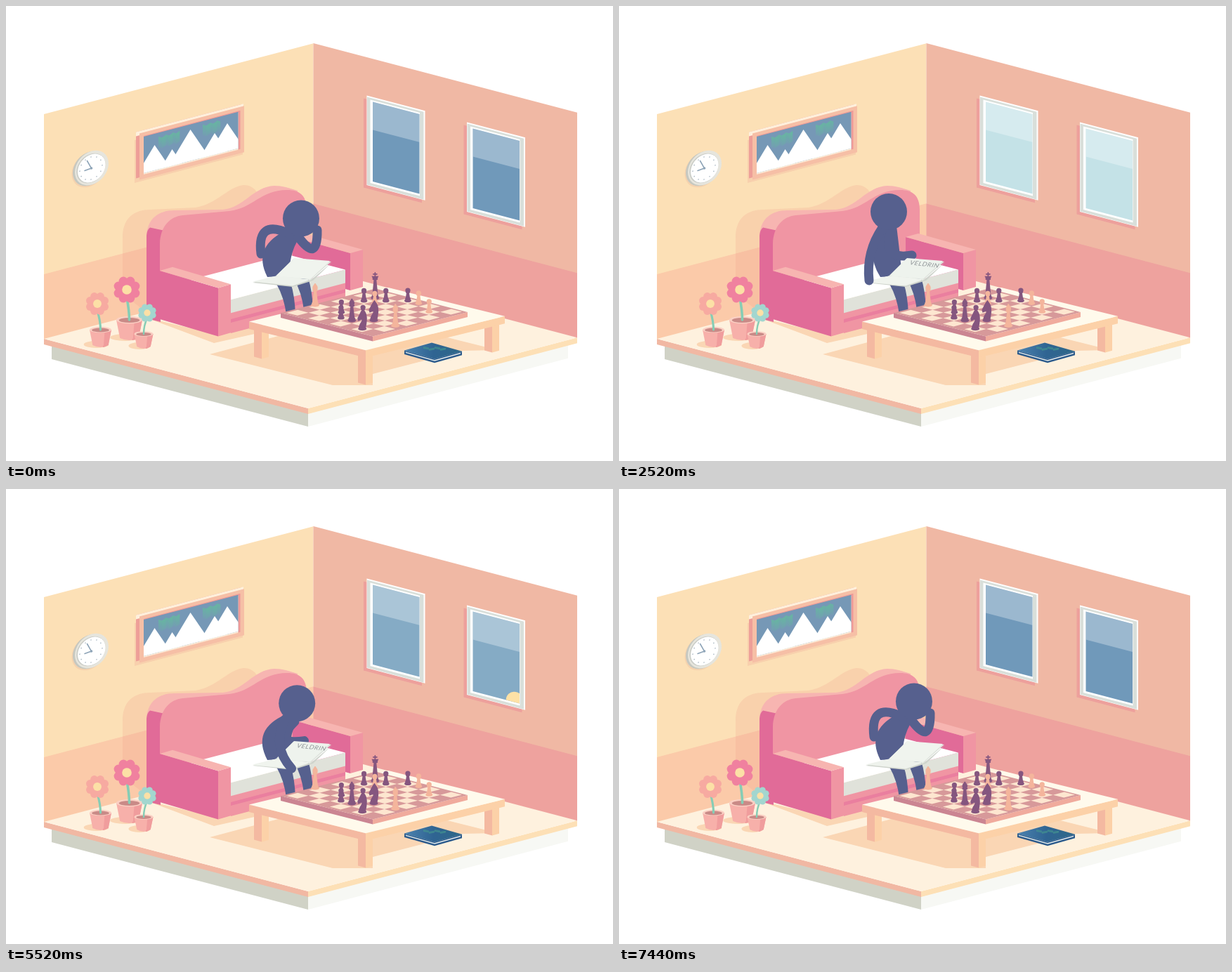
Write an HTML page with a canvas that moves like this. It is 864x648 px and loops after 8160 ms.

```html
<!DOCTYPE html>
<html lang="en">
<head>
<meta charset="utf-8">
<title>Chess room</title>
<style>
html, body { margin: 0; width: 100%; height: 100%; overflow: hidden; background: #fff; }
canvas { display: block; }
</style>
</head>
<body>
<canvas id="stage" width="864" height="648"></canvas>
<script>
const g = document.getElementById('stage').getContext('2d');
const LOOP = 8160, STEP = 40, K = 0.263; // K: slope of the isometric axes
const BODY = '#56608e', ROSE = '#f095a3', DEEP = '#e16b98', BLUSH = '#f7b5b1';
const SAND = '#fad6b4', PEACH = '#f4b9a1', HONEY = '#fcd1a8';
const PLUM = '#85567f', CORAL = '#f4b59c', DARK = '#d7999a', LIGHT = '#fde6d0';

const mix = (a, b, k) => a.map((v, i) => v + (b[i] - v) * k);
const part = (t, a, b) => Math.min(1, Math.max(0, (t - a) / (b - a)));
const ease = (t, a, b) => { const k = part(t, a, b); return k * k * (3 - 2 * k); };
// moves from one place to the next; each move is [place, begin, end]
const travel = (t, from, ...moves) => moves.reduce((p, [to, a, b]) => mix(p, to, ease(t, a, b)), from);

function poly(color, ...p) {
  g.beginPath();
  for (let i = 0; i < p.length; i += 2) g.lineTo(p[i], p[i + 1]);
  g.closePath();
  g.fillStyle = color;
  g.fill();
}
function shape(color, d) { g.fillStyle = color; g.fill(new Path2D(d)); }
function oval(color, x, y, rx, ry = rx) {
  g.beginPath(); g.ellipse(x, y, rx, ry, 0, 0, 7); g.fillStyle = color; g.fill();
}
function line(color, w, d) {
  g.strokeStyle = color; g.lineWidth = w; g.lineCap = 'round'; g.stroke(new Path2D(d));
}
// upright panel with top left corner (x, y)
function side(color, x, y, w, h, k = K) {
  poly(color, x, y, x + w, y + w * k, x + w, y + w * k + h, x, y + h);
}
// box with the left corner of its top at (x, y), a long to the front and b long to the back
function block(x, y, a, b, h, [top, left, right], k = K) {
  side(left, x, y, a, h, k);
  side(right, x + a, y + a * k, b, h, -k);
  poly(top, x, y, x + a, y + a * k, x + a + b, y + (a - b) * k, x + b, y - b * k);
}

function room() {
  block(65, 482, 365, 370, 21, ['#fff', '#d0d2c6', '#f7f8f4']);
  side('#fce0b6', 54, 154, 383.5, 320, -K);
  side('#fbcaa9', 54, 382, 383.5, 94, -K);
  side('#f0b8a4', 437.5, 53, 375.5, 320);
  side('#eea29e', 437.5, 281.5, 375.5, 94);
  block(54, 474, 376, 383, 8, ['#fef1de', '#f1b8a3', '#fde0b6']);
}

function clock() {
  const disc = (color, x, y, r) => {
    g.save(); g.transform(1, -K, 0, 1, x, y); oval(color, 0, 0, r); g.restore();
  };
  disc('#f5d2ae', 118, 233, 24.5);
  disc('#c6c8c0', 119, 231.5, 24);
  disc('#e6e5dd', 122, 230.5, 24);
  disc('#c9cbc5', 121, 231, 20.6);
  disc('#fff', 121.8, 231, 19.8);
  for (let a = 0; a < 6.2; a += Math.PI / 6)
    disc('#a9b7c2', 121 + 16 * Math.cos(a), 231 + 16 * (Math.sin(a) - K * Math.cos(a)), 0.8);
  line('#8fa5b8', 1.6, 'M115.5,220.5 L121.5,231 L112,234.5');
  oval('#8fa5b8', 121.5, 231, 1.8);
}

function aurora(x, y, n) {
  for (let i = 0; i < n; i++) {
    const top = y - i * 1.5 + (i % 2) * 3;
    const s = g.createLinearGradient(0, top, 0, top + 15);
    s.addColorStop(0, '#68b3a3');
    s.addColorStop(1, '#68b3a333');
    side(s, x + i * 5, top, 5.3, 15, i % 2 ? -0.7 : 0.3);
  }
}

function picture() {
  side('#f8d0ad', 183, 191, 154, 61, -K);
  side('#ee9f98', 185, 179.5, 149, 66, -K);
  side('#fef0dc', 185, 179.5, 153, 6, -K);
  side('#f6bfa6', 190, 181.5, 149, 66, -K);
  side('#ee9a98', 196, 185, 137.5, 55, -K);
  side('#fdebd5', 196, 187, 134.5, 53, -K);
  side('#7698b6', 196, 186, 134.5, 52, -K);
  g.save();
  g.clip();
  aurora(217, 186, 6);
  aurora(280, 169, 5);
  const peak = (x, y) => poly('#fff', x, y, x + 48, y + 70, x - 42, y + 70);
  peak(211.5, 198); peak(236.5, 204); peak(262.5, 176); peak(297, 181); peak(315, 167);
  g.restore();
}

function sunAt(t, day) {
  const a = (90 + 80 * Math.sin(0.419 * (t / 1000 - 2.95))) * Math.PI / 180;
  const x = -103 * Math.cos(a);
  return [628.5 + x, 316 - 131 * Math.sin(a) + 0.27 * x + 60 * (1 - day) ** 8];
}

function pane(dx, dy, day, sun) {
  g.save();
  g.translate(dx, dy);
  side('#eda09c', 509, 131.5, 83, 127);
  side('#fff', 513.5, 127.5, 83, 127.5);
  side('#d9dfda', 514, 129.5, 80.5, 125);
  side('#fff', 518.5, 133.5, 70.5, 118.5);
  side(`rgb(${mix([112, 153, 186], [196, 226, 231], day)})`, 522, 136.5, 66.5, 113.5);
  g.clip();
  g.save();
  g.transform(1, 0.2, 0, 1, sun[0] - dx, sun[1] - dy);
  oval('#fde1a6', 0, 0, 14, 15.3);
  g.restore();
  side('rgba(255,255,255,.3)', 522, 136, 67, 40.5);
  g.restore();
}

function plant(x, y, w, h, fx, fy, r, color) {
  const b = w * 0.72;
  oval(SAND, x - 6, y + h - 3, w * 1.15, 5);
  const wall = (c, l) => shape(c, `M${x + w * l},${y} L${x + b * l},${y + h - 2} Q${x},${y + h + 4} ${x + b},${y + h - 2} L${x + w},${y} Z`);
  wall('#f7b0aa', -1);
  wall('#f09d9d', 0.4);
  oval('#fbd0c4', x, y, w, w * 0.28);
  oval('#c98a87', x, y + 0.5, w * 0.8, w * 0.19);
  line('#86cdb5', r * 0.19, `M${x},${y} Q${x},${y - 12} ${fx},${fy + r * 0.6}`);
  for (let a = Math.PI / 8; a < 6.2; a += Math.PI / 4)
    oval(color, fx + r * 0.68 * Math.cos(a), fy + r * 0.68 * Math.sin(a), r * 0.34);
  oval(color, fx, fy, r * 0.75);
  oval('#fce0a6', fx, fy, r * 0.36);
}

function sofa() {
  shape('rgba(238,158,140,.24)', 'M166,410 L166,330 C166,302 182,290 206,290 L270,287 C300,282 315,258 338,255 C348,255 354,260 357,265 L300,330 L205,440 Z');
  poly(SAND, 200, 444, 302, 468, 420, 440, 420, 452, 296, 480);
  shape(BLUSH, 'M200,330 C200,304 216,291 240,291 L308,290 C338,288 352,257 382,256 C394,256 402,259 415,263 L415,300 L222,325 Z');
  shape(DEEP, 'M200,445 L200,327 Q201,318 205,315.5 L226,320 L219,378 L220,450 Z');
  shape(ROSE, 'M219,400 L219,338 C220,315 232,300 252,298 L318,292 C352,288 362,262 400,262 C418,262 428,270 428,290 L428,372 Z');
  const arm = [BLUSH, DEEP, ROSE];
  block(408, 329, 82, 18, 53, arm, 0.28);
  side(ROSE, 320, 430, 163, 36, -K);
  side('#ea7f9f', 320, 446, 163, 5, -K);
  block(237, 396.5, 83, 163, 19, ['#fff', '#fff', '#e0e2da']);
  block(219, 377, 83, 18, 69, arm, 0.295);
}

function limb(s, hand, length) {
  const dx = hand[0] - s[0], dy = hand[1] - s[1], d = Math.hypot(dx, dy) || 1;
  const bend = 1.4 * Math.sqrt(Math.max(0, length * length - d * d / 4)) / d;
  const elbow = [(s[0] + hand[0]) / 2 - dy * bend, (s[1] + hand[1]) / 2 + dx * bend];
  line(BODY, 13, `M${s} Q${elbow} ${hand}`);
}

function openBook(u) {
  poly('#cfd4cc', 351, 394, 384, 386, 433, 391, 464, 365, 437, 391, 408, 400);
  poly('#eef2ec', 351, 392.5, 384, 384.5, 434, 389.5, 408, 398.5);
  poly('#dfe4dd', 384, 384.5, 409, 360, 463, 364, 434, 389.5);
  poly('#eef3ed', 385, 384.5, 410, 359, 461, 363, 433, 388.5);
  if (u > 0) {
    g.save();
    g.transform(1, 0.12, -0.42, 0.9, 413, 368);
    g.font = '9px Lato, "Open Sans", sans-serif';
    g.letterSpacing = '0.5px';
    g.fillStyle = '#8d9296';
    g.fillText('VELDRIN', 0, 0);
    g.restore();
  }
  // free edge of the turning page
  const v = 1 - u;
  const dx = 27 * v * v - 92 * u * v - 31 * u * u;
  const dy = -25 * v * v - 88 * u * v + 9 * u * u;
  poly('#f0f4ee', 384, 384.5, 384 + dx, 384.5 + dy, 433 + dx, 389 + dy, 433, 389);
}

function person(t) {
  const think = 1 - ease(t, 880, 1680) + ease(t, 6800, 7440);
  const lean = 0.58 * think + 0.84 * ease(t, 3240, 3560) + 0.16 * ease(t, 4080, 4720) - ease(t, 4920, 6100);
  const rest = [356, 391], chin = [363, 353], grip = [434, 402];
  const near = travel(t, chin, [rest, 880, 1680], [grip, 3240, 3640], [[443, 371], 4080, 4720],
    [grip, 4920, 5200], [rest, 5200, 6000], [chin, 6800, 7440]);
  const brow = [443, 319], lap = [417, 355];
  const far = travel(t, brow, [lap, 880, 1680], [[399, 338], 1720, 1920], [lap, 1920, 2520],
    [[457, 374], 3240, 3560], [lap, 5000, 5720], [brow, 6800, 7440]);

  const hx = 384 + 62 * lean, hy = 293 + 25 * lean - 5 * think;
  const d = Math.hypot(388 - hx, 384 - hy), ux = (388 - hx) / d, uy = (384 - hy) / d;
  const nx = hx + ux * 20, ny = hy + uy * 20;
  const leg = 'M385,396 L405,394 Q411,412 412,440 L399,440 Q396,415 385,396 Z';
  shape(BODY, leg);
  g.save(); g.translate(25, -7); shape(BODY, leg); g.restore();
  shape(BODY, `M372,386 Q349,${350 - 16 * lean} ${nx - uy * 10},${ny + ux * 10}
    L${nx + uy * 10},${ny - ux * 10} Q${399 + 8 * lean},345 403,384 Z`);
  limb([nx + 3, ny + 7], far, 36);
  openBook(part(t, 1720, 2520) - part(t, 5760, 6400));
  limb([nx - 10, ny + 3], near, 40);
  oval(BODY, hx, hy, 26);
}

function floorBook() {
  const cover = '#2b5a8c';
  block(567, 492, 43, 39, 4, [cover, cover, cover], 0.285);
  block(569, 491, 41, 37, 3, ['#e6eeec', '#dfe9ea', '#eef3f0'], 0.285);
  const s = g.createLinearGradient(570, 485, 648, 495);
  s.addColorStop(0, '#4a80ad');
  s.addColorStop(0.5, '#2f6492');
  s.addColorStop(1, '#2f6888');
  block(567, 490.5, 43, 39, 1.5, [s, cover, cover], 0.285);
  for (let i = 0; i < 4; i++) side('#43958faa', 594 + i * 8, 485 + (i % 2) * 3, 8, 3, i % 2 ? -0.2 : 0.2);
}

function table() {
  const leg = (x, y) => { side(PEACH, x - 11, y - 3, 11, 39.5); side(HONEY, x, y, 10, 39.5, -K); };
  poly(SAND, 290, 496, 500, 440, 700, 490, 650, 491, 522, 524, 522, 540, 465, 540);
  floorBook();
  leg(692, 454);
  leg(364, 463);
  leg(512, 500);
  block(346, 449.5, 166, 198, 10.5, ['#fffaec', PEACH, HONEY], 0.245);
}

// a point of the board, counted in squares from its left corner
const onBoard = (i, j) => {
  const a = 0.25 + i * 0.9375, b = 0.25 + j * 0.9375;
  return [391 + 16.4 * a + 16.9 * b, 437 + 4.15 * a - 4.35 * b];
};
function board() {
  block(391, 437, 131, 135, 7, [DARK, '#cb8592', '#f0ab9d'], 0.256);
  for (let i = 0; i < 8; i++)
    for (let j = i % 2; j < 8; j += 2)
      poly(LIGHT, ...onBoard(i, j), ...onBoard(i + 1, j), ...onBoard(i + 1, j + 1), ...onBoard(i, j + 1));
}

const HEIGHT = { p: 20, n: 31, b: 33, k: 39 };
// a chessman standing at (x, y)
function man(kind, color, x, y) {
  const h = HEIGHT[kind], w = kind === 'p' ? 4.8 : 6;
  g.save();
  g.translate(x, y);
  oval(color, 0, -2, w, 2.6);
  oval(color, 0, -4.5, w * 0.8, 2.2);
  if (kind === 'n') {
    shape(color, `M-5,-4 C-4,-11 0,-12 -1,-15 L-6,-13 L-7,-17 L-2,${4 - h} L1,${-h} L3,${3 - h} C8,${8 - h} 7,-12 5,-4 Z`);
  } else {
    const top = h - (kind === 'p' ? 6 : 10);
    poly(color, -w * 0.7, -4, -1.8, -top, 1.8, -top, w * 0.7, -4);
    oval(color, 0, -top, w * 0.65, 1.6);
    if (kind === 'p') oval(color, 0, 3.6 - h, 3.6);
    if (kind === 'b') { oval(color, 0, 6.5 - h, 3.7, 5); oval(color, 0, 1.2 - h, 1.3); }
    if (kind === 'k') {
      poly(color, -3, -top, -5, 6 - h, 5, 6 - h, 3, -top);
      line(color, 1.8, `M0,${7 - h} L0,${1 - h} M-2.5,${3 - h} L2.5,${3 - h}`);
    }
  }
  g.restore();
}

// kind and square, back to front; capitals are the pale side
const MEN = 'k16 p15 p26 p37 P25 P47 P66 p22 p31 p42 b41 n52 B72 n60';
function pieces() {
  for (const m of MEN.split(' ')) {
    const kind = m[0].toLowerCase();
    const [x, y] = onBoard(+m[1] + 0.5, +m[2] + 0.5);
    man(kind, m[0] === kind ? PLUM : CORAL, x, y + 1.5);
  }
}

function heldPiece(k) {
  g.save();
  g.translate(440, 428 - 32 * k);
  g.rotate(0.25 * k);
  man('b', CORAL, 0, 0);
  g.globalAlpha = k;
  oval('#c97b8a', 0, -1.5, 5.6, 2.6);
  g.restore();
}

function draw(t) {
  g.fillStyle = '#fff';
  g.fillRect(0, 0, 864, 648);
  const day = part(t, 40, 840) - part(t, 4920, 5720), sun = sunAt(t, day);
  room();
  clock();
  picture();
  pane(0, 0, day, sun);
  pane(142.5, 38, day, sun);
  sofa();
  plant(175.5, 447, 18.5, 28, 172, 404, 19, '#f0819f');
  plant(134.5, 461, 15.5, 24, 130, 424, 16.5, '#f7aaa1');
  plant(196, 467, 13.5, 20, 201, 437, 13, '#a3d6cf');
  person(t);
  table();
  board();
  pieces();
  heldPiece(ease(t, 4080, 4720) - ease(t, 4920, 5200));
}

const start = performance.now();
function tick(now) {
  const t = Math.max(0, now - start) % LOOP;
  draw(Math.floor(t / STEP) * STEP);
  requestAnimationFrame(tick);
}
draw(0);
requestAnimationFrame(tick);
</script>
</body>
</html>
```
